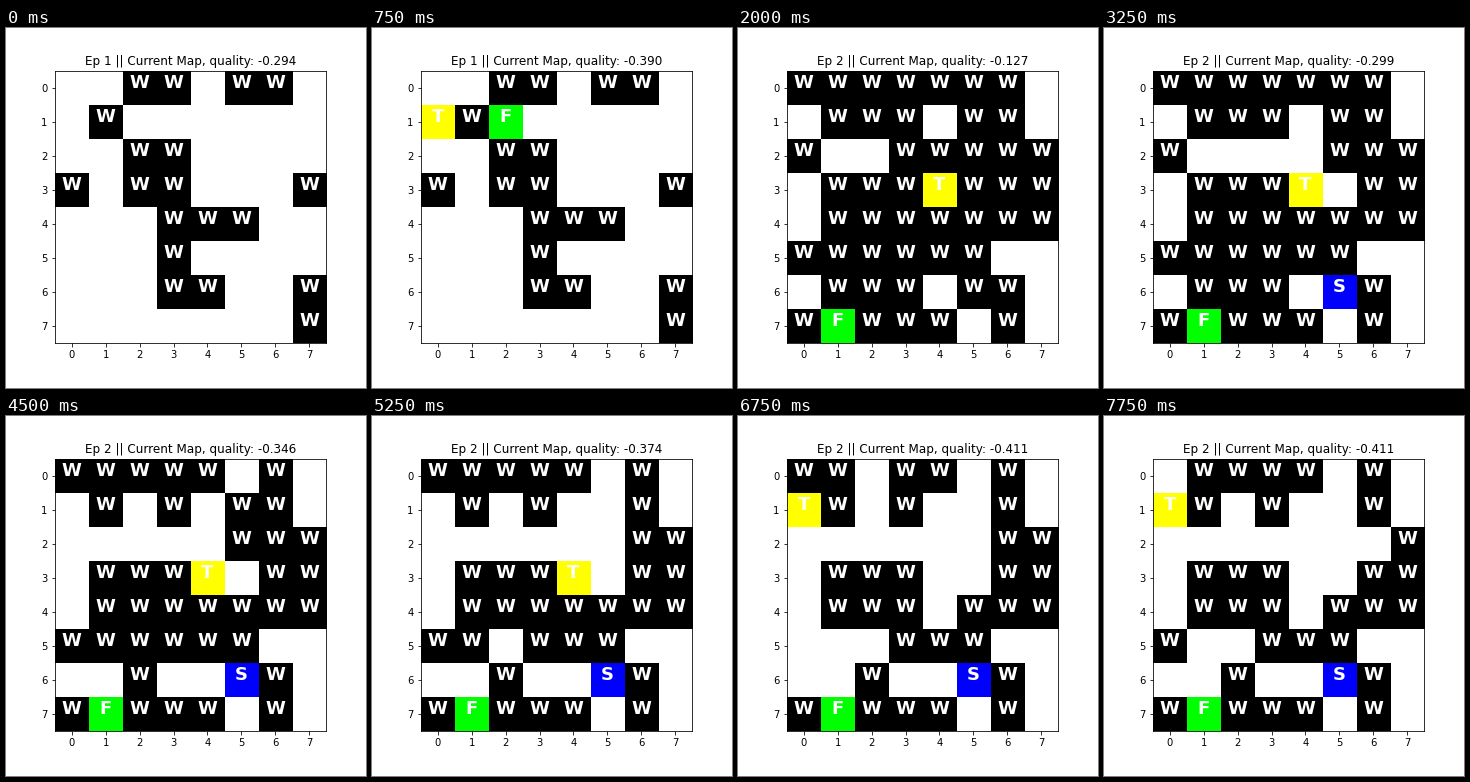
Recreate the animation shown at these times as a matplotlib script. Size 360 px wide and 360 px high, loop 8000 ms.

```python
import numpy as np
import matplotlib.pyplot as plt
from matplotlib.animation import FuncAnimation

COLORS = {".": (255, 255, 255), "W": (0, 0, 0), "T": (255, 255, 0),
          "F": (0, 255, 0), "S": (0, 0, 255)}
STEPS = {"U": (0, -1), "D": (0, 1), "L": (-1, 0), "R": (1, 0)}

MAPS = [
    "..WW.WW. .W...... ..WW.... W.WW...W ...WWW.. ...W.... ...WW..W .......W",
    "WWWWWWW. .WWW.WW. W..WWWWW .WWWTWWW .WWWWWWW WWWWWW.. .WWW.WW. WFWWW.W.",
]
# One edit per frame: column, row, tile
EDITS = [
    "01T 21F 12S",
    "32. 42. 53. 56S 02. 50. 21. 16. 36. 51. 52. 25. 43. 01T "
    "15. 44. 05. 20. 20W 05W 00. 62.",
]
FRAMES, INTERVAL = 32, 250
EP_START = [0, 8]
LEAD = 2            # frames before the first edit
SOLVED = 5          # frame at which the path of episode 1 appears
SOLVED_QUALITY = 2.233


def quality(board):
    q = 0.6 * np.sum(board == "W") / 64 - 0.472
    for tile, cost in (("T", 0.048), ("F", 0.048), ("S", 0.134)):
        q -= cost * np.any(board == tile)
    return q


def board_at(ep, frame):
    board = np.array([list(row) for row in MAPS[ep].split()])
    done = max(0, frame - EP_START[ep] - LEAD + 1)
    for col, row, tile in EDITS[ep].split()[:done]:
        board[int(row), int(col)] = tile
    return board


def draw_route(x, y, moves, color):
    arrows = []
    for move in moves:
        dx, dy = STEPS[move]
        arrows.append(ax.arrow(x, y, dx, dy, width=0.05, head_width=0.2,
                               head_length=0.2, length_includes_head=True,
                               fc="white", ec=color))
        x, y = x + dx, y + dy
    return arrows


fig, ax = plt.subplots(figsize=(5, 5), dpi=72)
fig.subplots_adjust(left=0.125, right=0.9, bottom=0.125, top=0.88)
image = ax.imshow(np.full((8, 8, 3), 255, np.uint8), interpolation="nearest")
labels = [[ax.text(c, r, "", color="white", size=18, weight="bold", ha="center")
           for c in range(8)] for r in range(8)]
title = ax.set_title("", fontsize=12)

route = draw_route(1.1, 2.1, "LU", "y")
route += draw_route(-0.1, 0.9, "DRDDRDDDRRRUURUUUULLLL", "g")

ax.set_xticks(range(8))
ax.set_yticks(range(8))
ax.set_xlim(-0.5, 7.5)
ax.set_ylim(7.5, -0.5)


def update(frame):
    ep = int(frame >= EP_START[1])
    board = board_at(ep, frame)
    solved = ep == 0 and frame >= SOLVED
    image.set_data(np.array([[COLORS[t] for t in row] for row in board], np.uint8))
    for r in range(8):
        for c in range(8):
            labels[r][c].set_text(board[r, c].replace(".", ""))
    for arrow in route:
        arrow.set_visible(solved)
    q = SOLVED_QUALITY if solved else quality(board)
    title.set_text(f"Ep {ep + 1} || Current Map, quality: {q:.3f}")
    return []


anim = FuncAnimation(fig, update, frames=FRAMES, interval=INTERVAL,
                     init_func=lambda: update(0), repeat=True, repeat_delay=0)
plt.show()
```
